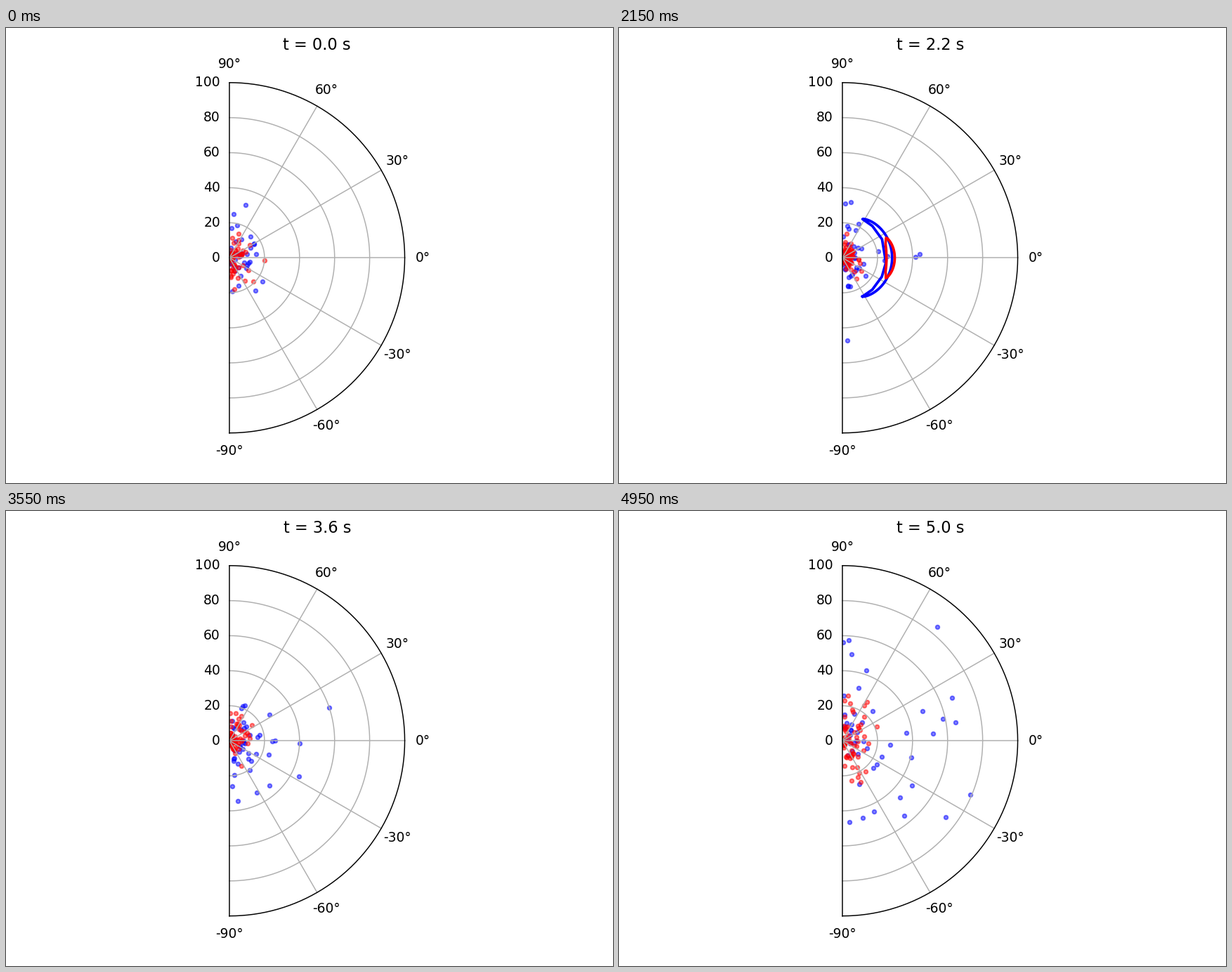
Animation of 864 by 648 pixels, one loop 5000 ms. Source, as a matplotlib script:

```python
import numpy as np
import matplotlib.pyplot as plt
from matplotlib.animation import FuncAnimation
from matplotlib.patches import Wedge

W, H, DPI = 864, 648, 135
FRAMES, DURATION = 100, 5.0
CX, CY, RADIUS = 318.06, 320.76, 249.48
UNIT = RADIUS / 100
T_REF = 2.626  # time at which the outline sizes below hold
GRID = "#b0b0b0"
N_BLUE, N_RED = 50, 60

plt.rcParams["font.family"] = "DejaVu Sans"
fig = plt.figure(figsize=(W / DPI, H / DPI), dpi=DPI, facecolor="white")
ax = fig.add_axes([0, 0, 1, 1])
ax.set_xlim(0, W)
ax.set_ylim(0, H)
ax.axis("off")


def place(r, deg):
    """Polar position in data units to stage pixels."""
    a = np.radians(deg)
    return CX + UNIT * r * np.cos(a), CY + UNIT * r * np.sin(a)


def draw_chart():
    half_turn = np.linspace(-90, 90, 181)
    for r in range(20, 100, 20):
        ax.plot(*place(r, half_turn), color=GRID, lw=0.8, zorder=1.5)
    for deg in range(-60, 90, 30):
        ax.plot(*place(np.array([0, 100]), deg), color=GRID, lw=0.8, zorder=1.5)
    ax.plot(*place(100, half_turn), color="black", lw=0.8, zorder=2.5)
    ax.plot([CX, CX], [CY - RADIUS, CY + RADIUS], color="black", lw=0.8,
            solid_capstyle="projecting", zorder=2.5)
    for r in range(0, 101, 20):
        ax.text(CX - 13.1, CY + UNIT * r, str(r), ha="right", va="center", size=10)
    label_r = (RADIUS + 26.25) / UNIT
    for deg in range(-90, 91, 30):
        ax.text(*place(label_r, deg), f"{deg}°", ha="center", va="center", size=10)


def growth(size, rate, bend, x):
    return size * np.exp(rate * x + bend * x * x)


OUTER_U = np.sin(np.linspace(-np.pi / 2, np.pi / 2, 60))
INNER_U = np.array([1, 0.75, 0.4, -0.1, -0.41, -0.75, -1])


def crescent(outer, inner, tip, half_angle):
    """Closed outline: smooth outer arc, inner arc made of a few chords."""
    inner = min(inner, outer)
    r_out = tip + (outer - tip) * (1 - OUTER_U ** 2) ** 0.7
    r_in = tip + (inner - tip) * np.sqrt(1 - INNER_U ** 2)
    r = np.concatenate([r_out, r_in])
    u = np.concatenate([OUTER_U, INNER_U])
    return place(r, half_angle * u)


def blue_outline(t):
    x = t - T_REF
    return crescent(growth(58.9, 1.61, 0, x), growth(47.9, 1.436, 0, x),
                    growth(50.7, 1.5, -0.15, x), growth(46.6, -0.65, 0, x))


def red_outline(t):
    x = t - T_REF
    return crescent(growth(61.3, 1.45, -0.3, x), growth(55.7, 1.5, -0.55, x),
                    growth(58.2, 1.47, -0.42, x), growth(12.5, -1.48, 0, x))


def blue_spread(t):
    return 12 + 40 * np.exp(0.87 * (t - DURATION))


def red_spread(t):
    return np.interp(t, [0, 0.8, 1.6, 2.6, 3.1, 4, 5], [9, 9, 7.5, 5, 6, 10, 15])


def cloud(rng, count, spread):
    r = np.abs(rng.normal(0, spread, count))
    deg = rng.uniform(-90, 90, count)
    keep = r <= 100
    return np.column_stack(place(r[keep], deg[keep]))


draw_chart()
clip = Wedge((CX, CY), RADIUS, -90, 90, facecolor="none", edgecolor="none")
ax.add_patch(clip)


def make_dots(color):
    dots = ax.scatter([], [], s=9, c=color, linewidths=1, alpha=0.5, zorder=1)
    dots.set_clip_path(clip)
    return dots


def make_outline(color):
    line, = ax.plot([], [], color=color, lw=2, zorder=2)
    line.set_clip_path(clip)
    return line


blue_dots, red_dots = make_dots("blue"), make_dots("red")
blue_line, red_line = make_outline("blue"), make_outline("red")
title = ax.text(442.8, H - 31, "", ha="center", va="baseline", size=12)


def update(i):
    t = DURATION * i / (FRAMES - 1)
    rng = np.random.default_rng(i + 7)
    blue_dots.set_offsets(cloud(rng, N_BLUE, blue_spread(t)))
    red_dots.set_offsets(cloud(rng, N_RED, red_spread(t)))
    blue_line.set_data(*blue_outline(t))
    red_line.set_data(*red_outline(t))
    blue_line.set_visible(0.5 < t < 3.4)
    red_line.set_visible(1.2 < t < 3.2)
    title.set_text(f"t = {t:.1f} s")
    return blue_dots, red_dots, blue_line, red_line, title


anim = FuncAnimation(fig, update, frames=FRAMES, interval=50, repeat=True,
                     repeat_delay=0, init_func=lambda: update(0))
plt.show()
```
